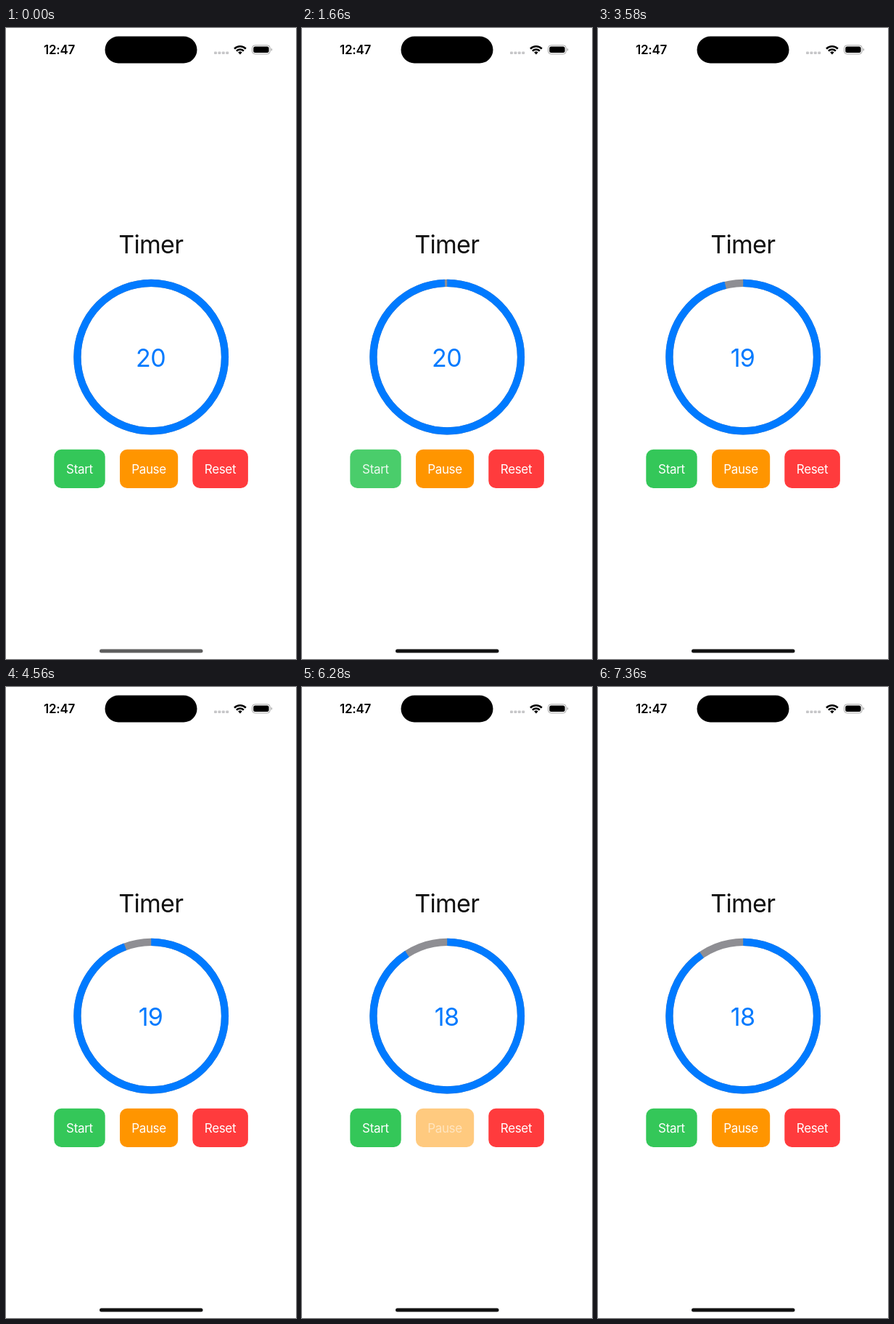
Write an HTML page that moves like this. It is 400 by 868 pixels and loops after 8 s.

```html
<!DOCTYPE html>
<html lang="en">
<head>
<meta charset="utf-8">
<title>Timer</title>
<style>
  html, body { margin: 0; width: 100%; height: 100%; overflow: hidden; background: #fff; }
  svg { display: block; width: 100vw; height: 100vh; }
  text { font-family: Inter, "Liberation Sans", sans-serif; text-anchor: middle; }
  .big { font-size: 34px; letter-spacing: -0.7px; }
  .button text { font-size: 17px; letter-spacing: -0.35px; fill: #fff; }
  .clock { font-size: 17px; font-weight: 600; letter-spacing: -0.3px; }
</style>
</head>
<body>
<svg viewBox="0 0 400 868">
  <text class="clock" x="73.5" y="36">12:47</text>
  <rect x="136.5" y="11.5" width="127" height="37" rx="18.5"/>
  <g fill="#c6c6c8">
    <rect x="287" y="32.5" width="4" height="3.6" rx="1"/>
    <rect x="292.4" y="32.5" width="4" height="3.6" rx="1"/>
    <rect x="297.8" y="32.5" width="4" height="3.6" rx="1"/>
    <rect x="303.2" y="32.5" width="4" height="3.6" rx="1"/>
  </g>
  <g fill="none" stroke="#000" stroke-width="2.5">
    <path d="M315 28.6a11 11 0 0 1 15.8 0"/>
    <path d="M317.9 31.7a7 7 0 0 1 10 0"/>
  </g>
  <path d="M320.2 33.6a3.9 3.9 0 0 1 5.4 0L322.9 36.4z"/>
  <rect x="339.5" y="23.8" width="24.8" height="12" rx="3.9" fill="none" stroke="#a5a5a5"/>
  <rect x="341.2" y="25.5" width="21.4" height="8.6" rx="2.5"/>
  <path d="M365.7 27.8q1.5.5 1.5 2t-1.5 2z" fill="#a5a5a5"/>

  <text class="big" x="199.7" y="310" fill="#111">Timer</text>

  <g fill="none" stroke-width="10.2">
    <circle cx="200.2" cy="452.6" r="101.8" stroke="#8e8e93"/>
    <circle id="arc" cx="200.2" cy="452.6" r="101.8" stroke="#007aff"
      pathLength="360" transform="rotate(-90 200.2 452.6)"/>
  </g>
  <g fill="#007aff">
    <text class="big" id="now" x="199.5" y="465.5">20</text>
    <text class="big" id="next" x="199.5" y="465.5"></text>
  </g>

  <g class="button" id="start">
    <rect x="66.3" y="579.8" width="70.4" height="53.2" rx="10" fill="#34c759"/>
    <text x="101.4" y="613">Start</text>
  </g>
  <g class="button" id="pause">
    <rect x="157" y="579.8" width="80.2" height="53.2" rx="10" fill="#ff9500"/>
    <text x="197" y="613">Pause</text>
  </g>
  <g class="button">
    <rect x="257.3" y="579.8" width="76.6" height="53.2" rx="10" fill="#ff3b3d"/>
    <text x="295.5" y="613">Reset</text>
  </g>

  <rect id="home" x="129" y="854.5" width="142.5" height="5" rx="2.5"/>
</svg>
<script>
const LOOP = 8000, FIRST = 820, LAST = 139;
const $ = id => document.getElementById(id);

// Tables of [step, value], linear in between.
const GAP = [[12, 0], [31, 5.9], [58, 14], [97, 26.3], [117, 32.9], [121, 34.2]];
const START = [[-1, 1], [2, .5], [6, .5], [10, .65], [17, .88], [29, 1]];
const PAUSE = [[110, 1], [113, .5], [118, .5], [122, .67], [128, .88], [139, 1]];
const HOME = [[7, 94], [16, 17]];
const FADES = [[7.6, 20], [25.8, 19]];
const FADE_SPAN = 1.8;

// The picture advances in bursts: two short steps and a long one per 140 ms.
function stepAt(t) {
  if (t < FIRST) return -1;
  const u = t - FIRST - 100;
  if (u < 0) return 0;
  const r = u % 140;
  return Math.min(LAST, 1 + 3 * Math.floor(u / 140) + (r < 20 ? 0 : r < 40 ? 1 : 2));
}

function sample(table, n) {
  if (n <= table[0][0]) return table[0][1];
  for (let i = 1; i < table.length; i++) {
    const [a, x] = table[i - 1], [b, y] = table[i];
    if (n <= b) return x + (y - x) * (n - a) / (b - a);
  }
  return table[table.length - 1][1];
}

function setButton(id, alpha) {
  for (const part of $(id).children) part.setAttribute("opacity", alpha);
}

function setCount(gap) {
  let count = 20, mix = 0;
  for (const [from, value] of FADES) {
    if (gap < from) break;
    mix = (gap - from) / FADE_SPAN;
    count = value;
    if (mix >= 1) { count--; mix = 0; }
  }
  $("now").textContent = count;
  $("now").setAttribute("opacity", 1 - mix);
  $("next").textContent = mix ? count - 1 : "";
  $("next").setAttribute("opacity", mix);
}

function draw(t) {
  const n = stepAt(t), gap = sample(GAP, n), c = Math.round(sample(HOME, n));
  $("arc").setAttribute("stroke-dasharray", gap ? `${360 - gap} 360` : "none");
  setCount(gap);
  setButton("start", sample(START, n));
  setButton("pause", sample(PAUSE, n));
  $("home").setAttribute("fill", `rgb(${c},${c},${c})`);
}

let origin;
function tick(now) {
  origin ??= now;
  draw((now - origin) % LOOP);
  requestAnimationFrame(tick);
}
draw(0);
requestAnimationFrame(tick);
</script>
</body>
</html>
```
